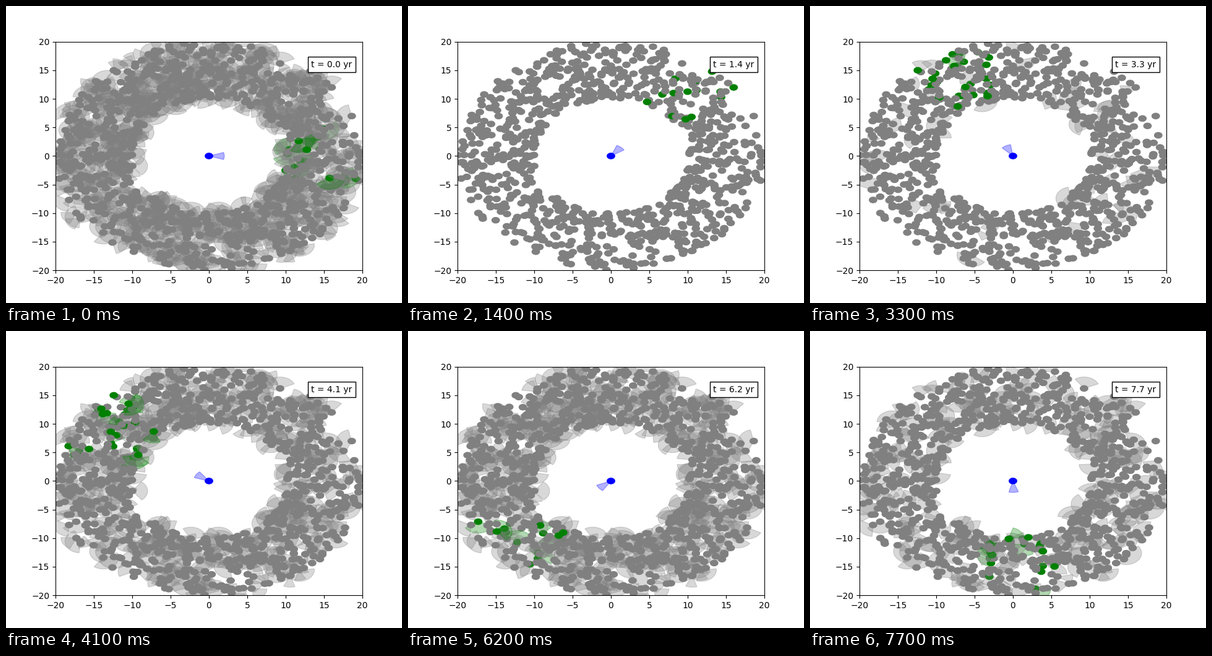
A matplotlib script for the animation above (7800 ms loop, 640 px wide and 480 px high).

```python
import numpy as np
import matplotlib.pyplot as plt
from matplotlib.animation import FuncAnimation
from matplotlib.collections import PolyCollection
from matplotlib.colors import to_rgba
from matplotlib.patches import Circle, Wedge

FRAMES, STEP_MS = 78, 100
N_STARS = 1000
INNER, OUTER = 10, 20
DOT_R, BEAM_R = 0.5, 2.0
SPIN, HALF = 35.4, 18.0   # central beam: degrees per year, half width
PULSE = 1.05              # years a star keeps its beam on
LISTENING = 0.2           # share of stars that answer the central beam
POINTS = 32

# Empty patches in the ring: x, y, radius
VOIDS = [(-8.1, 12.2, 1.6), (16.7, 10.2, 1.9), (1.4, -15.5, 1.3)]

rng = np.random.default_rng(7)


def scatter_ring(n):
    r = rng.uniform(INNER, OUTER, n)
    a = rng.uniform(0, 2 * np.pi, n)
    xy = np.column_stack([r * np.cos(a), r * np.sin(a)])
    keep = np.ones(n, bool)
    for x, y, size in VOIDS:
        keep &= np.hypot(xy[:, 0] - x, xy[:, 1] - y) > size
    return xy[keep]


def arc(radius, start, stop, n):
    a = np.linspace(start, stop, n, axis=-1)
    return radius * np.stack([np.cos(a), np.sin(a)], axis=-1)


stars = scatter_ring(N_STARS)
count = len(stars)
bearing = np.degrees(np.arctan2(stars[:, 1], stars[:, 0]))
listens = rng.random(count) < LISTENING
period = rng.normal(2.02, 0.14, count)
heading = rng.uniform(0, 2 * np.pi, count)
spread = np.radians(rng.uniform(40, 170, count))

# For every star: its dot, then its beam
shapes = np.zeros((count, 2, POINTS, 2))
shapes[:, 0] = arc(DOT_R, 0, 2 * np.pi, POINTS)
shapes[:, 1, 1:] = arc(BEAM_R, heading - spread / 2, heading + spread / 2,
                       POINTS - 1)
shapes += stars[:, None, None, :]

GREY, GREEN = (np.array([to_rgba(c), to_rgba(c, 0.3)])
               for c in ("gray", "green"))

fig, ax = plt.subplots(figsize=(6.4, 4.8), dpi=100)
ax.set_xlim(-OUTER, OUTER)
ax.set_ylim(-OUTER, OUTER)

ring = PolyCollection([], linewidths=1, zorder=1)
ax.add_collection(ring, autolim=False)
ax.add_patch(Circle((0, 0), DOT_R, color="blue", zorder=2))
beam = ax.add_patch(Wedge((0, 0), BEAM_R, -HALF, HALF, color="blue",
                          alpha=0.3, zorder=2))
clock = ax.text(0.9, 0.9, "", transform=ax.transAxes, ha="center",
                va="center", bbox=dict(facecolor="white"))


def draw(i):
    t = i * STEP_MS / 1000
    aim = SPIN * t
    off_axis = (bearing - aim + 180) % 360 - 180
    lit = listens & (np.abs(off_axis) < HALF)

    shown = np.ones((count, 2), bool)
    shown[:, 1] = t % period < PULSE
    colors = np.where(lit[:, None, None], GREEN, GREY)[shown]
    ring.set_verts(shapes[shown])
    ring.set_facecolor(colors)
    ring.set_edgecolor(colors)

    beam.set_theta1(aim - HALF)
    beam.set_theta2(aim + HALF)
    clock.set_text(f"t = {t:.1f} yr")
    return ring, beam, clock


anim = FuncAnimation(fig, draw, frames=FRAMES, interval=STEP_MS, repeat=True,
                     repeat_delay=0, blit=False)
plt.show()
```
